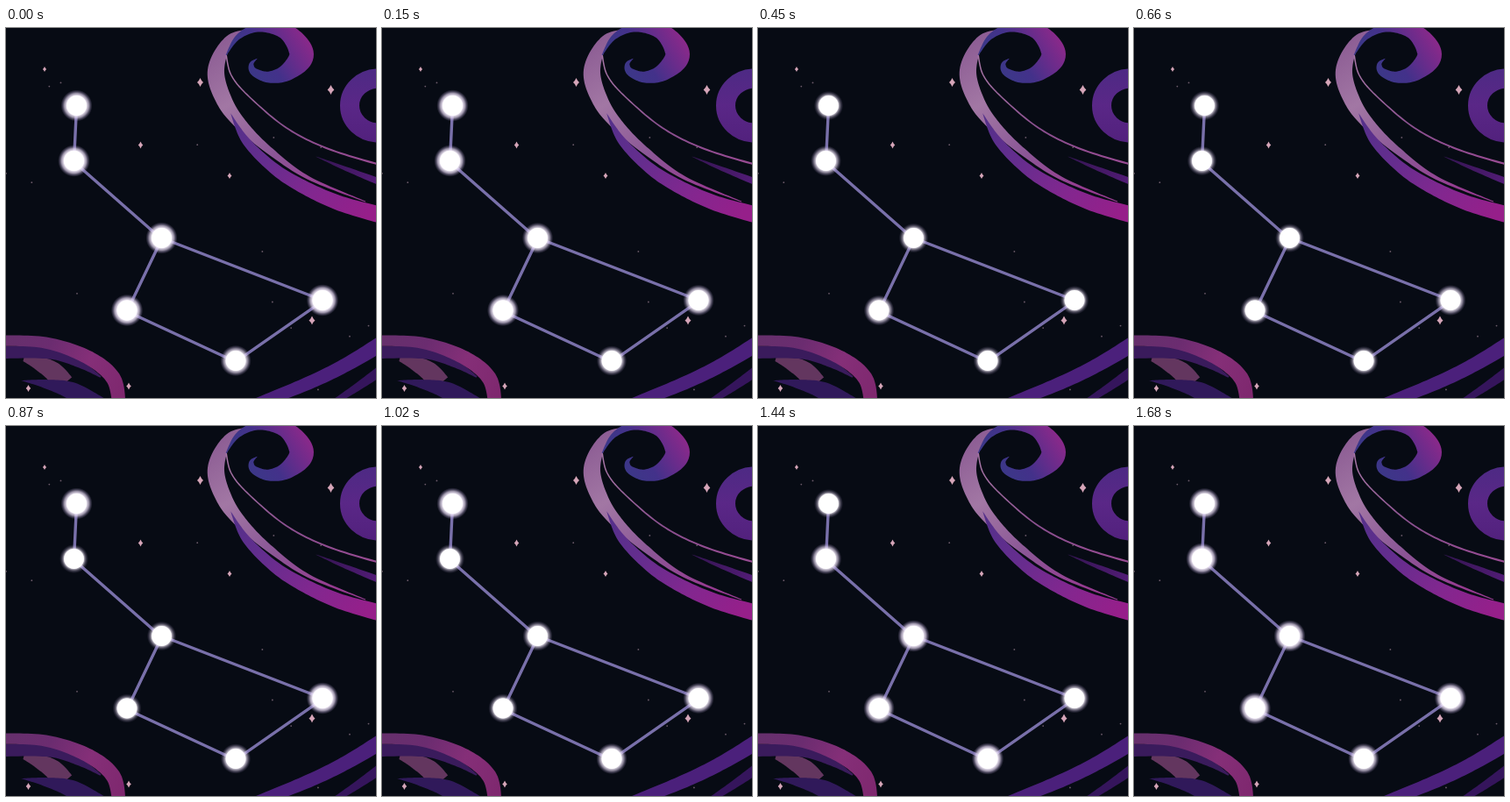
An HTML page with a canvas that plays this animation: 422 by 422 pixels, repeating every 1710 ms.

```html
<!DOCTYPE html>
<html lang="en">
<head>
<meta charset="utf-8">
<title>Constellation</title>
<style>
html, body { margin: 0; width: 100%; height: 100%; overflow: hidden; background: #070b14; }
canvas { display: block; width: 100vw; height: 100vh; }
</style>
</head>
<body>
<canvas id="sky" width="422" height="422"></canvas>
<script>
const SIZE = 422, LOOP = 1710, STEP = 30, TAU = Math.PI * 2;
const ctx = document.getElementById('sky').getContext('2d');

// Each star pulses `beats` times per loop, brightest at `peak` (share of the loop).
const STARS = [
  { x: 80.5, y: 88.5, beats: 2, peak: 0.06 },
  { x: 77.5, y: 151.5, beats: 1, peak: 0.02 },
  { x: 177.5, y: 239.5, beats: 1, peak: 0.9 },
  { x: 138, y: 322, beats: 1, peak: 0 },
  { x: 262, y: 379.5, beats: 1, peak: 0.8 },
  { x: 361, y: 310.5, beats: 2, peak: 0 }
];

// x, y, half height
const SPARKS = [
  [44, 47, 3], [221.5, 62, 5], [370.5, 70.5, 5.5], [153.5, 133.5, 4],
  [255, 168.5, 3.5], [349, 333.5, 5], [25.5, 411, 4], [140, 408.5, 4]
];

function seeded(seed) {
  return () => {
    seed = (seed * 16807) % 2147483647;
    return seed / 2147483647;
  };
}

function spline(a, b, c, d, u) {
  return b + 0.5 * u * (c - a + u * (2 * a - 5 * b + 4 * c - d + u * (3 * (b - c) + d - a)));
}

// Smooth band through a few [x, y, width] points.
function ribbon(g, points, fill) {
  const spine = [], steps = 14, last = points.length - 1;
  for (let s = 0; s <= last * steps; s++) {
    const i = Math.min(Math.floor(s / steps), last - 1);
    const at = k => points[Math.max(0, Math.min(last, i + k))];
    spine.push([0, 1, 2].map(n =>
      spline(at(-1)[n], at(0)[n], at(1)[n], at(2)[n], s / steps - i)));
  }
  const side = sign => spine.map(([x, y, w], i) => {
    const p = spine[Math.max(0, i - 1)], q = spine[Math.min(spine.length - 1, i + 1)];
    const dx = q[0] - p[0], dy = q[1] - p[1];
    const k = sign * Math.max(0, w) / 2 / Math.hypot(dx, dy);
    return [x - dy * k, y + dx * k];
  });
  g.fillStyle = fill;
  g.beginPath();
  for (const [x, y] of [...side(1), ...side(-1).reverse()]) g.lineTo(x, y);
  g.fill();
}

function gradient(g, x0, y0, x1, y1, ...colors) {
  const fill = g.createLinearGradient(x0, y0, x1, y1);
  colors.forEach((c, i) => fill.addColorStop(i / (colors.length - 1), c));
  return fill;
}

function disc(g, x, y, r, fill) {
  g.fillStyle = fill;
  g.beginPath();
  g.arc(x, y, r, 0, TAU);
  g.fill();
}

function drawSwirl(g) {
  // pale sweep, then the purple one that overlaps it
  ribbon(g, [[284, 2, 3], [255, 13, 10], [239.5, 48, 19], [249, 83, 18], [270, 112, 13],
    [302, 141, 8], [345, 171, 4], [410, 198, 1]],
    gradient(g, 238, 8, 365, 190, '#8a5a92', '#a277a4', '#8b5796', '#963b90'));
  ribbon(g, [[256, 97, 0], [273, 128, 9], [303, 158, 12.5], [334, 178.5, 15], [378, 199, 17], [430, 214, 19]],
    gradient(g, 256, 100, 410, 215, '#53308a', '#652d8e', '#82278f', '#961f8a'));
  // fine strand and the blade beneath it
  ribbon(g, [[251, 30, 1.5], [257, 54, 1.5], [277, 78, 1.6], [320, 114, 1.8], [368, 138, 2], [430, 157, 2.3]],
    gradient(g, 250, 25, 422, 155, '#a878a6', '#8a4f8e', '#984a92'));
  ribbon(g, [[352, 146, 0], [385, 159.5, 4.5], [430, 177, 8]],
    gradient(g, 352, 146, 422, 175, '#32144f', '#521c76'));
  // curl
  ribbon(g, [[251, 31, 1], [265, 10, 6], [290, -1, 11], [320, 5, 19], [337, 30, 28],
    [321, 50, 20], [300, 56, 13], [283, 50, 9], [280, 41, 5], [287, 34.5, 0]],
    gradient(g, 282, 54, 346, 14, '#3c3788', '#43318a', '#682c8b', '#8b298a'));
}

function drawRing(g) {
  g.strokeStyle = gradient(g, 400, 46, 400, 130, '#4d2a84', '#5a2787', '#52217d');
  g.lineWidth = 22;
  g.beginPath();
  g.ellipse(425, 88.5, 33, 31, 0, 0, TAU);
  g.stroke();
}

function drawLowerLeft(g) {
  ribbon(g, [[20, 378, 4], [38, 383, 16], [54, 392, 22], [66, 406, 24]], '#63365f');
  ribbon(g, [[-8, 370, 14], [50, 371, 13], [85, 384, 8], [108, 398, 2]], '#3a1b5c');
  ribbon(g, [[17, 402, 0], [45, 406, 10], [75, 414, 20], [105, 432, 24]], '#30195a');
  ribbon(g, [[-8, 356.5, 12], [45, 359, 13], [92, 375, 16], [122, 399, 17], [129, 430, 15]],
    gradient(g, 0, 355, 132, 415, '#66306c', '#6b2c70', '#852f78', '#7f286f'));
}

function drawLowerRight(g) {
  ribbon(g, [[285, 429, 13], [345, 405, 15], [388, 384, 16], [430, 359, 18]], '#4b207b');
  ribbon(g, [[372, 428, 6], [400, 410, 9], [430, 389, 12]], '#35155c');
}

function drawDots(g) {
  const random = seeded(41);
  for (let i = 0; i < 14; i++) {
    disc(g, random() * SIZE, random() * SIZE, 0.9, 'rgba(210,171,192,0.5)');
  }
}

function drawSpark(g, x, y, r) {
  const w = r * 0.7, k = r * 0.3;
  g.fillStyle = '#d5a5b8';
  g.beginPath();
  g.moveTo(x, y - r);
  g.quadraticCurveTo(x + k, y - k, x + w, y);
  g.quadraticCurveTo(x + k, y + k, x, y + r);
  g.quadraticCurveTo(x - k, y + k, x - w, y);
  g.quadraticCurveTo(x - k, y - k, x, y - r);
  g.fill();
}

function drawLinks(g) {
  const drop = 1.2, hub = STARS[2], end = STARS[5];
  g.strokeStyle = '#7970aa';
  g.lineWidth = 3.4;
  g.lineJoin = 'round';
  g.beginPath();
  STARS.forEach(s => g.lineTo(s.x, s.y + drop));
  g.moveTo(hub.x, hub.y);
  g.lineTo(end.x, end.y);
  g.stroke();
}

function makeBackdrop() {
  const layer = document.createElement('canvas');
  layer.width = layer.height = SIZE;
  const g = layer.getContext('2d');
  g.fillStyle = '#070b14';
  g.fillRect(0, 0, SIZE, SIZE);
  drawSwirl(g);
  drawRing(g);
  drawLowerLeft(g);
  drawLowerRight(g);
  drawDots(g);
  SPARKS.forEach(spark => drawSpark(g, ...spark));
  drawLinks(g);
  return layer;
}

function drawStar({ x, y, beats, peak }, phase) {
  const glow = 0.68 + 0.25 * Math.cos(TAU * beats * (phase - peak));
  const core = 11.4, reach = 15 + 3.5 * glow;
  const halo = ctx.createRadialGradient(x, y, core, x, y, reach);
  halo.addColorStop(0, `rgba(250,243,255,${0.55 + 0.45 * glow})`);
  halo.addColorStop(0.4, `rgba(225,212,238,${0.75 * glow})`);
  halo.addColorStop(0.7, `rgba(185,168,210,${0.35 * glow})`);
  halo.addColorStop(1, 'rgba(160,140,190,0)');
  disc(ctx, x, y, reach, halo);
  disc(ctx, x, y, core, '#fff');
}

const backdrop = makeBackdrop();
const start = performance.now();

function frame() {
  const elapsed = (performance.now() - start) % LOOP;
  const phase = Math.floor(elapsed / STEP) * STEP / LOOP;
  ctx.drawImage(backdrop, 0, 0);
  STARS.forEach(star => drawStar(star, phase));
  requestAnimationFrame(frame);
}
frame();
</script>
</body>
</html>
```
